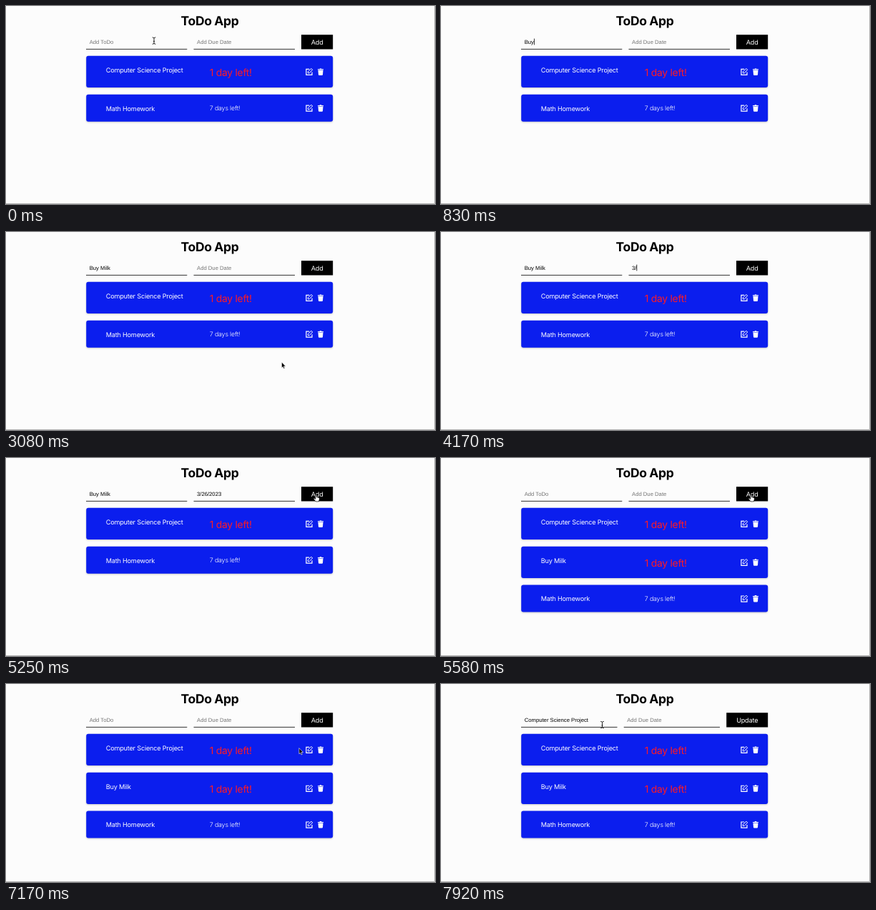
Animation of 600 by 277 pixels, one loop 8 s. Source, as an HTML page:

```html
<!DOCTYPE html>
<html lang="en">
<head>
<meta charset="utf-8">
<title>ToDo App</title>
<style>
html, body { margin: 0; width: 100%; height: 100%; overflow: hidden; background: #fcfcfc; }
svg { display: block; width: 100%; height: 100%; }
text { font-family: Inter, sans-serif; text-rendering: geometricPrecision; white-space: pre; }
.head { font-size: 17.5px; font-weight: 700; letter-spacing: -.02em; text-anchor: middle; }
.field { font: 7.69px "Liberation Sans", Arial, sans-serif; }
.button, .task { font-size: 9.1px; letter-spacing: -.02em; fill: #fff; }
.button { text-anchor: middle; }
.due { font-size: 8.9px; font-weight: 300; letter-spacing: -.02em; fill: #fff; }
.due.soon { font-size: 13.9px; font-weight: 400; fill: #ff1a24; }
.card { fill: #0b1eee; filter: drop-shadow(0 1px 1px #0003); }
</style>
</head>
<body>
<svg viewBox="0 0 600 277">
  <defs>
    <g id="icons" fill="none" stroke="#fff">
      <path d="M.2-3.8H-4.1V4.3H4V.3" stroke-width="1.2"/>
      <path d="M-1.6 1.7V-.2L2.9-4.7 4.7-2.9.2 1.7z" stroke-width="1"/>
      <path d="M12-3.9h2.4l.6-.8h2l.6.8H20v1.2h-8zM12.5-2.2h7l-.5 6q-.1 1-1 1h-4q-.9 0-1-1z" fill="#fff" stroke="none"/>
    </g>
    <path id="beam" d="M-2.3-4.6Q0-4.6 0-3.2V3.4Q0 4.8-2.3 4.8M2.3-4.6Q0-4.6 0-3.2M0 3.4Q0 4.8 2.3 4.8M-1 .9H1" fill="none" stroke="#111" stroke-width=".9"/>
    <path id="arrow" d="M0 0V8.2L1.8 6.5 3 9.3 4.4 8.7 3.2 5.9H5.7z" fill="#000" stroke="#fff" stroke-width=".6"/>
    <path id="hand" d="M-.8.4Q0-.5.8.4V3.2Q1.9 2.6 2.3 3.5 3.3 3 3.6 4 4.8 3.7 4.8 5V6.6L3.9 9.4H-.4L-3.4 5.6Q-3.3 4.3-2.1 4.9L-.8 6z" fill="#fff" stroke="#000" stroke-width=".7"/>
  </defs>
  <rect width="600" height="277" fill="#fcfcfc"/>
  <path d="M599.5 0V276.5H0" fill="none" stroke="#b4b4b4"/>
  <text class="head" x="285" y="27">ToDo App</text>
  <path id="lines" stroke="#333" stroke-width="1"/>
  <text id="todo" class="field" x="116.7" y="52.6"></text>
  <text id="date" class="field" y="52.6"></text>
  <rect id="box" y="40.2" height="20.3"/>
  <text id="label" class="button" y="53.8"></text>
  <rect id="caret" y="45.6" width=".8" height="8.8"/>
  <g id="list"></g>
  <use id="mouse"/>
</svg>
<script>
const LOOP = 8000, ADDED = 5460, EDITED = 7420;
const $ = id => document.getElementById(id);
const set = (id, attrs) => { for (const k in attrs) $(id).setAttribute(k, attrs[k]); };

// Each entry is the moment a character appears.
const todoKeys = [600, 700, 800, 1000, 1210, 1430, 1550, 1660];
const dateKeys = [3960, 4150, 4260, 4340, 4430, 4520, 4600, 4680, 4770, 4850];
const typed = (text, keys, t) => text.slice(0, keys.filter(k => k <= t).length);

// time, x, y of the pointer's hot spot
const route = [
  [0, 207, 48.5], [2250, 207, 48.5], [2900, 385.5, 182], [3080, 385.5, 182],
  [3680, 318, 52], [4880, 318, 52], [5070, 486, 56], [5230, 433.5, 51.5],
  [5960, 433.5, 51.5], [6460, 223, 57], [6700, 223, 57], [7260, 423.5, 92],
  [7600, 423.5, 92], [7900, 225.5, 57], [LOOP, 225.5, 57]
];

function pointer(t) {
  const i = route.findIndex(p => p[0] > t);
  const [t0, x0, y0] = route[i - 1], [t1, x1, y1] = route[i];
  const u = (t - t0) / (t1 - t0), e = u * u * (3 - 2 * u);
  return [x0 + (x1 - x0) * e, y0 + (y1 - y0) * e];
}

function pointerShape(x, y, editing) {
  const within = (a, b) => x > a && x < b;
  if (y > 40 && y < 61) {
    if (within(editing ? 399 : 413, 457)) return "#hand";
    if (within(112, editing ? 246 : 253) || within(editing ? 256 : 262, editing ? 390 : 404)) return "#beam";
  }
  return y > 86 && y < 98 && within(418, 445) ? "#hand" : "#arrow";
}

function card(name, days, y) {
  const soon = days === 1, h = soon ? 44.3 : 38;
  return `<rect class="card" x="112.2" y="${y}" width="345" height="${h}" rx="3"/>
    <text class="task" x="139.7" y="${y + 22.8}">${name}</text>
    <text class="due ${soon ? "soon" : ""}" x="284.8" y="${y + (soon ? 27.8 : 22.6)}">${days} day${soon ? "" : "s"} left!</text>
    <use href="#icons" x="424" y="${y + h / 2 + .2}"/>`;
}

let shown;
function drawList(added) {
  if (shown === added) return;
  shown = added;
  $("list").innerHTML = card("Computer Science Project", 1, 69.8) +
    (added ? card("Buy Milk", 1, 123.7) : "") +
    card("Math Homework", 7, added ? 177.6 : 123.7);
}

function fill(id, value, hint) {
  $(id).textContent = value || hint;
  set(id, { fill: value ? "#000" : "#757575" });
  return value ? $(id).getComputedTextLength() : 0;
}

function draw(t) {
  const added = t >= ADDED, editing = t >= EDITED;
  const todo = editing ? "Computer Science Project" : added ? "" : typed("Buy Milk", todoKeys, t);
  const date = added ? "" : typed("3/26/2023", dateKeys, t);
  const dateX = editing ? 255.7 : 262.5;
  drawList(added);

  set("lines", { d: editing ? "M112 60.4H246.5M255.7 60.4H390" : "M112 60.4H253.3M262.5 60.4H404" });
  set("date", { x: dateX + 4.5 });
  set("box", { x: editing ? 399.2 : 413, width: editing ? 58 : 44.2 });
  set("label", { x: editing ? 428.2 : 435.1 });
  $("label").textContent = editing ? "Update" : "Add";
  const todoW = fill("todo", todo, "Add ToDo");
  const dateW = fill("date", date, "Add Due Date");

  const inTodo = t >= 250 && t < 2980, inDate = t >= 3720 && t < 5220;
  const last = [250, 3720, ...todoKeys, ...dateKeys].filter(k => k <= t).reduce((a, b) => Math.max(a, b), 0);
  const lit = (inTodo || inDate) && (t - last) % 1000 < 500;
  set("caret", { x: inTodo ? 116.7 + todoW : dateX + 4.5 + dateW, opacity: lit ? 1 : 0 });

  const [x, y] = pointer(t);
  const hidden = t >= 580 && t < 2250 || t >= 3920 && t < 4880;
  set("mouse", { href: pointerShape(x, y, editing), x, y, opacity: hidden ? 0 : 1 });
}

const start = performance.now();
function tick() {
  draw((performance.now() - start) % LOOP);
  requestAnimationFrame(tick);
}
tick();
</script>
</body>
</html>
```
